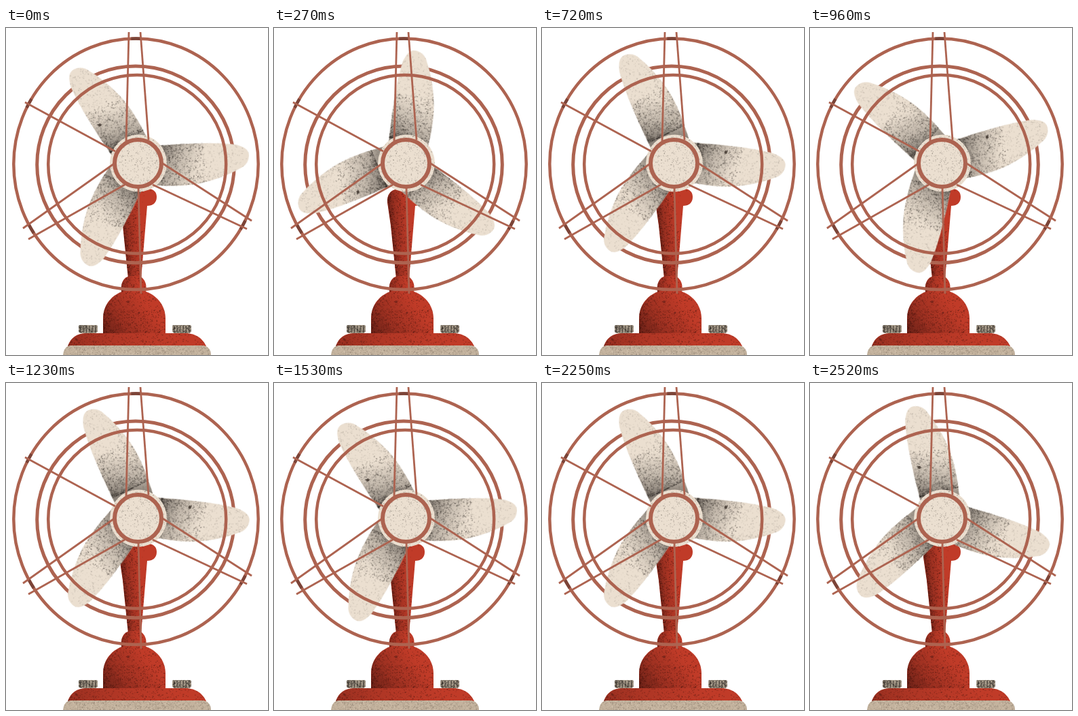
An HTML page with a canvas for the animation above (2550 ms loop, 386 px wide and 480 px high).

```html
<!DOCTYPE html>
<html lang="en">
<head>
<meta charset="utf-8">
<title>Desk fan</title>
<style>
html, body { margin: 0; width: 100%; height: 100%; overflow: hidden; background: #fff; }
canvas { display: block; width: 386px; height: 480px; }
</style>
</head>
<body>
<canvas id="stage" width="386" height="480"></canvas>
<script>
const W = 386, H = 480, STEP = 30, CYCLE = 17;
const CREAM = '#ebdfd0', RED = '#c03b28', WIRE = '#ad6350', INK = '#2b2622', SOOT = '#43150f';
const ctx = document.getElementById('stage').getContext('2d');

let seed = 7;
function rnd() {
  seed = (seed * 1664525 + 1013904223) >>> 0;
  return seed / 4294967296;
}

function layer(w, h, paint) {
  const c = document.createElement('canvas');
  c.width = w;
  c.height = h;
  paint(c.getContext('2d'));
  return c;
}

// Fill a shape, shade it, then dust it with specks placed by pick().
function shape(g, d, fill, shade, ...dusts) {
  const p = new Path2D(d);
  g.save();
  g.fillStyle = fill;
  g.fill(p);
  g.clip(p);
  if (shade) {
    const [x1, y1, x2, y2, rgb, alpha] = shade;
    const grad = g.createLinearGradient(x1, y1, x2, y2);
    grad.addColorStop(0, `rgba(${rgb},${alpha})`);
    grad.addColorStop(0.4, `rgba(${rgb},${alpha * 0.45})`);
    grad.addColorStop(1, `rgba(${rgb},0)`);
    g.fillStyle = grad;
    g.fill(p);
  }
  for (const [n, color, alpha, pick] of dusts) {
    g.fillStyle = color;
    for (let i = 0; i < n; i++) {
      const [x, y] = pick();
      const s = 0.7 + rnd() * 0.8;
      g.globalAlpha = alpha * (0.4 + rnd() * 0.6);
      g.fillRect(x, y, s, s);
    }
  }
  g.restore();
}

// Random point in a box; powers above 1 crowd it to the left or top.
const box = (x, y, w, h, px = 1, py = 1) =>
  () => [x + w * rnd() ** px, y + h * rnd() ** py];

function dot(g, x, y, r, color) {
  g.fillStyle = color;
  g.beginPath();
  g.arc(x, y, r, 0, 7);
  g.fill();
}

function ring(g, x, y, rx, ry, width, from = 0, to = 2 * Math.PI, color = WIRE) {
  g.strokeStyle = color;
  g.lineWidth = width;
  g.beginPath();
  g.ellipse(x, y, rx, ry, 0, from, to);
  g.stroke();
}

const BLADE = 'M15-24L42-23.4C80-24 118-22 146-17C160-13 167-7 166 1C165 11 158 17 151 19' +
  'C130 29 100 37 75 37.4C58 38 45 37 15 33Z';
const blades = [0, 1, 2].map(i => layer(172, 80, g => {
  g.translate(0, 40);
  shape(g, BLADE, CREAM, [36, -12, 92, 12, '43,38,34', 0.5],
    [650, INK, 0.22, box(20, -28, 146, 68)],
    [900, INK, 0.6, box(34, -26, 66, 64, 2.2, 1.4)],
    [220, INK, 0.3, () => [50 + 112 * rnd(), 36 - 14 * rnd() ** 2]]);
  if (i === 2) dot(g, 77, -13, 2.3, '#51473f');
}));

const stand = layer(W, H, g => {
  shape(g, 'M167 256C166 245 172 237 183 236H211C219 237 222 242 222 248C222 257 216 261 208 261' +
    'L199 368H180L172 290Z', RED, [170, 300, 200, 298, '67,21,15', 0.6],
    [700, SOOT, 0.6, () => {
      const v = rnd();
      return [167 + 13 * v + 27 * rnd() ** 2, 240 + 128 * v];
    }],
    [130, SOOT, 0.35, box(166, 235, 56, 132)]);
  shape(g, 'M177 366C184 363 194 363 200 366C207 372 208 381 205 391H171C168 381 170 371 177 366Z', RED,
    [169, 380, 196, 376, '67,21,15', 0.5],
    [160, SOOT, 0.55, box(169, 364, 38, 28, 1.8)]);
  shape(g, 'M143 453V427C143 405 157 391 174 386C183 384 194 384 203 386C221 391 235 406 235 427V453Z', RED,
    [145, 446, 205, 402, '67,21,15', 0.65],
    [750, SOOT, 0.55, box(143, 384, 92, 70, 1.9)],
    [450, SOOT, 0.5, () => [143 + 92 * rnd(), 453 - 40 * rnd() ** 2]]);
  dot(g, 180, 402, 2, '#7d261b');
  dot(g, 196, 418, 1.6, '#7d261b');

  for (const x of [107, 245]) {
    shape(g, `M${x} 438Q${x} 436 ${x + 2} 436H${x + 26}Q${x + 28} 436 ${x + 28} 438V445Q${x + 27} 448 ${x + 25} 448H${x + 3}Q${x} 447 ${x} 445Z`,
      '#a99d8c', null, [130, INK, 0.7, box(x, 435, 28, 13, x < 200 ? 1.5 : 1)]);
    g.fillStyle = 'rgba(43,38,34,.55)';
    for (let k = 0; k < 6; k++) g.fillRect(x + 2 + k * 4.4, 437, 1.6, 10);
  }

  shape(g, 'M91 467C95 455 104 448 119 448H264C281 448 290 457 295 467Z', RED,
    [91, 460, 250, 456, '67,21,15', 0.3],
    [420, SOOT, 0.5, box(91, 447, 205, 21, 1.5)]);
  shape(g, 'M84 480C85 472 88 466 97 466H289C298 466 302 473 302 480Z', '#c4b39e', null,
    [700, '#665a4e', 0.35, box(84, 465, 218, 15)],
    [250, '#f0e4d3', 0.4, box(84, 465, 218, 15)]);
});

const hub = layer(W, H, g => {
  shape(g, 'M153 198.5a42 42 0 1 0 84 0a42 42 0 1 0-84 0Z', CREAM, null,
    [650, INK, 0.28, box(153, 156, 84, 85)]);
  ring(g, 194.5, 198.5, 34.5, 34.5, 6);
});

const RODS = [
  [181, 6, 177, 166], [198, 6, 210, 164], [28, 109, 161, 181], [25, 294, 158, 200],
  [33, 310, 175, 230], [231, 199, 362, 283], [216, 230, 355, 295], [195, 234, 199, 390]
];
const cage = layer(W, H, g => {
  const rim = [191.5, 199.8, 180.2, 184.3, 4.5];
  ring(g, 193.2, 200, 131, 131, 4.5);
  ring(g, ...rim);
  for (const deg of [-90, -151, 149, 29]) {
    const a = deg * Math.PI / 180;
    ring(g, ...rim, a - 0.04, a + 0.04, '#7b4438');
  }
  g.strokeStyle = WIRE;
  g.lineWidth = 2.8;
  for (const [x1, y1, x2, y2] of RODS) {
    g.beginPath();
    g.moveTo(x1, y1);
    g.lineTo(x2, y2);
    g.stroke();
  }
});

// Four turns per cycle, settling at the end, on a loose axle: step, x, y, degrees.
const SPIN = [
  [0, 192.3, 198.7, 0],
  [7, 193, 189.7, -591.4],
  [10, 187.3, 202.3, -903],
  [16, 192.7, 195.3, -1420],
  [17, 192.3, 198.7, -1440]
];

function pose(t) {
  const i = SPIN.findIndex(k => k[0] > t);
  const a = SPIN[i - 1], b = SPIN[i];
  const u = (t - a[0]) / (b[0] - a[0]);
  return a.map((v, k) => v + (b[k] - v) * u);
}

function draw(ms) {
  const [, x, y, deg] = pose(Math.floor(ms / STEP) % CYCLE);
  ctx.fillStyle = '#fff';
  ctx.fillRect(0, 0, W, H);
  ctx.drawImage(stand, 0, 0);
  ring(ctx, 191, 200.4, 145.3, 144.3, 5);
  blades.forEach((b, i) => {
    ctx.save();
    ctx.translate(x, y);
    ctx.rotate((deg - 4.3 + 120 * i) * Math.PI / 180);
    ctx.drawImage(b, 0, -40);
    ctx.restore();
  });
  ctx.drawImage(hub, 0, 0);
  ctx.drawImage(cage, 0, 0);
}

let start;
function tick(now) {
  start ??= now;
  draw(Math.max(0, now - start));
  requestAnimationFrame(tick);
}
draw(0);
requestAnimationFrame(tick);
</script>
</body>
</html>
```
